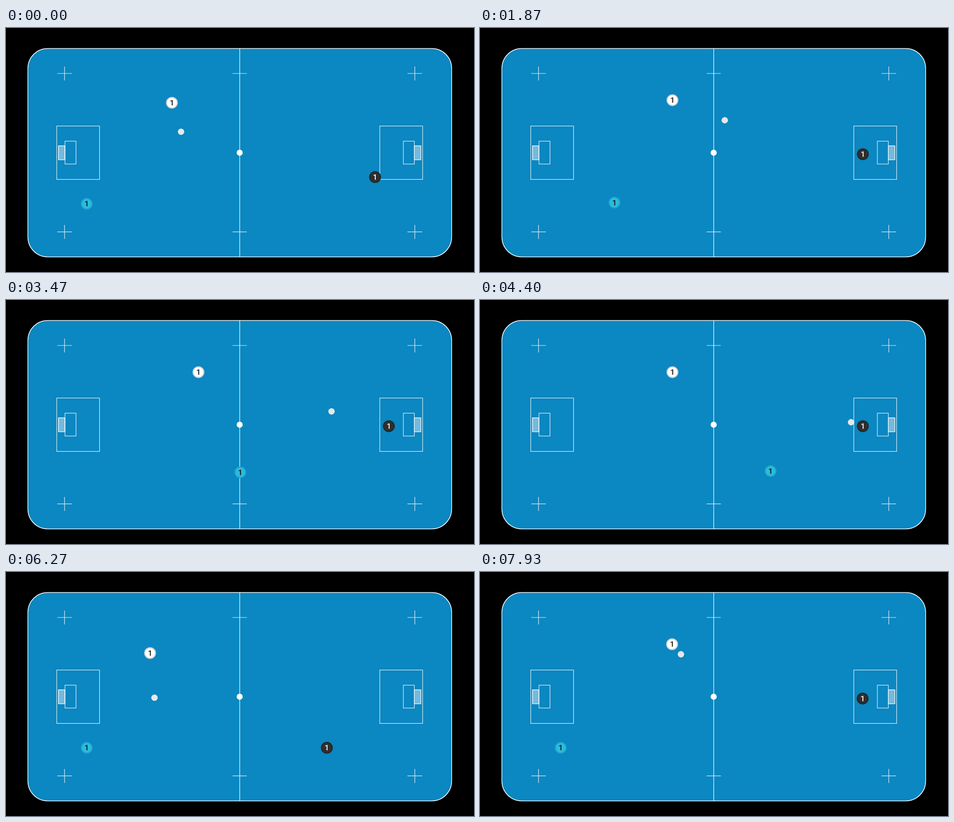
These frames come from a looping animation (1033x542 px, 8000 ms). An HTML page:

```html
<!DOCTYPE html>
<html lang="en">
<head>
<meta charset="utf-8">
<title>Pitch drill</title>
<style>
  html, body { margin: 0; width: 100%; height: 100%; overflow: hidden; background: #000; }
  svg { display: block; width: 100vw; height: 100vh; }
  text { font: 500 17px Roboto, sans-serif; text-anchor: middle; }
</style>
</head>
<body>
<svg viewBox="0 0 1033 542">
  <defs>
    <pattern id="net" width="2" height="2" patternUnits="userSpaceOnUse">
      <path d="M0 .5H2M.5 0V2" stroke="#fff" stroke-width=".5" stroke-opacity=".45"/>
    </pattern>
    <clipPath id="round"><circle r="6.6"/></clipPath>
    <g id="half" fill="none" stroke="#fff" stroke-width="1.2" stroke-opacity=".9">
      <rect x="112" y="217.7" width="94.5" height="118.7"/>
      <rect x="130.2" y="251.4" width="24.3" height="50.8"/>
      <rect x="116" y="261.6" width="14.2" height="31" fill="#fff" fill-opacity=".27"/>
      <rect x="116" y="261.6" width="14.2" height="31" fill="url(#net)"/>
      <path d="M113 101H145.500M129.200 85.500V116.500M113 452.800H145.500M129.200 437.500V468.500"/>
    </g>
  </defs>
  <rect width="1033" height="542"/>
  <rect x="48.300" y="45.500" width="935.400" height="463" rx="44" fill="#0b87c1" stroke="#fff" stroke-width="1.500"/>
  <path d="M515.900 45.500V508.500" stroke="#fff" stroke-width="1.400" stroke-opacity=".9"/>
  <path d="M500 101H531.500M500 452.800H531.500" stroke="#fff" stroke-width="1.200" stroke-opacity=".9"/>
  <use href="#half"/>
  <use href="#half" transform="translate(1031.600 0) scale(-1 1)"/>
  <circle cx="515.800" cy="277" r="6.700" fill="#fff"/>
  <g id="pieces"></g>
</svg>
<script>
const LOOP = 8000, STEP = 200 / 3;
const PERIOD = 7130, RUN1 = 3385, RUN2 = 3362;
const PAUSE = (PERIOD - RUN1 - RUN2) / 2;
const START = 4560; // time at which the drill restarts inside the loop

// first: run-up path, second: attack path, both at even time intervals
const pieces = {
  light: {
    look: ['#fff', '#cfd0d4', '#111'],
    first: [[236, 262], [291, 192.5], [343.7, 168.3], [424.8, 160.3]]
  },
  dark: {
    look: ['#302f2f', '#252525', '#fff'],
    first: [[414, 475], [608.5, 432], [803, 350.8], [845, 280.3]]
  },
  cyan: {
    look: ['#2bbbdc', '#1ea3cc', '#111'],
    first: [[178.2, 390.4]],
    second: [[178.2, 390.4], [641.4, 380]]
  },
  ball: {
    first: [[214.9, 373.2], [364.1, 249], [444.4, 182]],
    times: [0, 2 / 3, 1],
    second: [[444.4, 182], [819, 271.6]]
  }
};

function along(path, u, times) {
  const last = path.length - 1;
  if (!last) return path[0];
  const at = i => times ? times[i] : i / last;
  u = Math.min(1, Math.max(0, u));
  let i = 0;
  while (i < last - 1 && u > at(i + 1)) i++;
  const k = (u - at(i)) / (at(i + 1) - at(i));
  return path[i].map((v, n) => v + (path[i + 1][n] - v) * k);
}

function player([fill, rim, ink]) {
  return `<circle r="13.1" fill="${rim}"/><circle r="10.7" fill="${fill}"/>` +
    `<text y="6" fill="${ink}">1</text>`;
}

function ball() {
  let d = '';
  for (let c = -8; c <= 8; c += 4) d += `M${c - 8} -8l16 16M${c + 8} -8l-16 16`;
  return '<circle r="7" fill="#fff"/>' +
    `<path d="${d}" clip-path="url(#round)" stroke="#a3a6a8" stroke-width=".9" stroke-dasharray="1.8 1"/>`;
}

const layer = document.getElementById('pieces');
for (const p of Object.values(pieces)) {
  p.node = document.createElementNS('http://www.w3.org/2000/svg', 'g');
  p.node.innerHTML = p.look ? player(p.look) : ball();
  layer.append(p.node);
}

function draw(ms) {
  const t = Math.floor((ms % LOOP + 3.4) / STEP) * STEP;
  const c = (t - START + PERIOD) % PERIOD;
  const attack = c - RUN1 - PAUSE;
  for (const p of Object.values(pieces)) {
    const [x, y] = attack > 0 && p.second
      ? along(p.second, attack / RUN2)
      : along(p.first, c / RUN1, p.times);
    p.node.setAttribute('transform', `translate(${x.toFixed(2)} ${y.toFixed(2)})`);
  }
}

const t0 = performance.now();
function tick() {
  draw(performance.now() - t0);
  requestAnimationFrame(tick);
}
tick();
</script>
</body>
</html>
```
